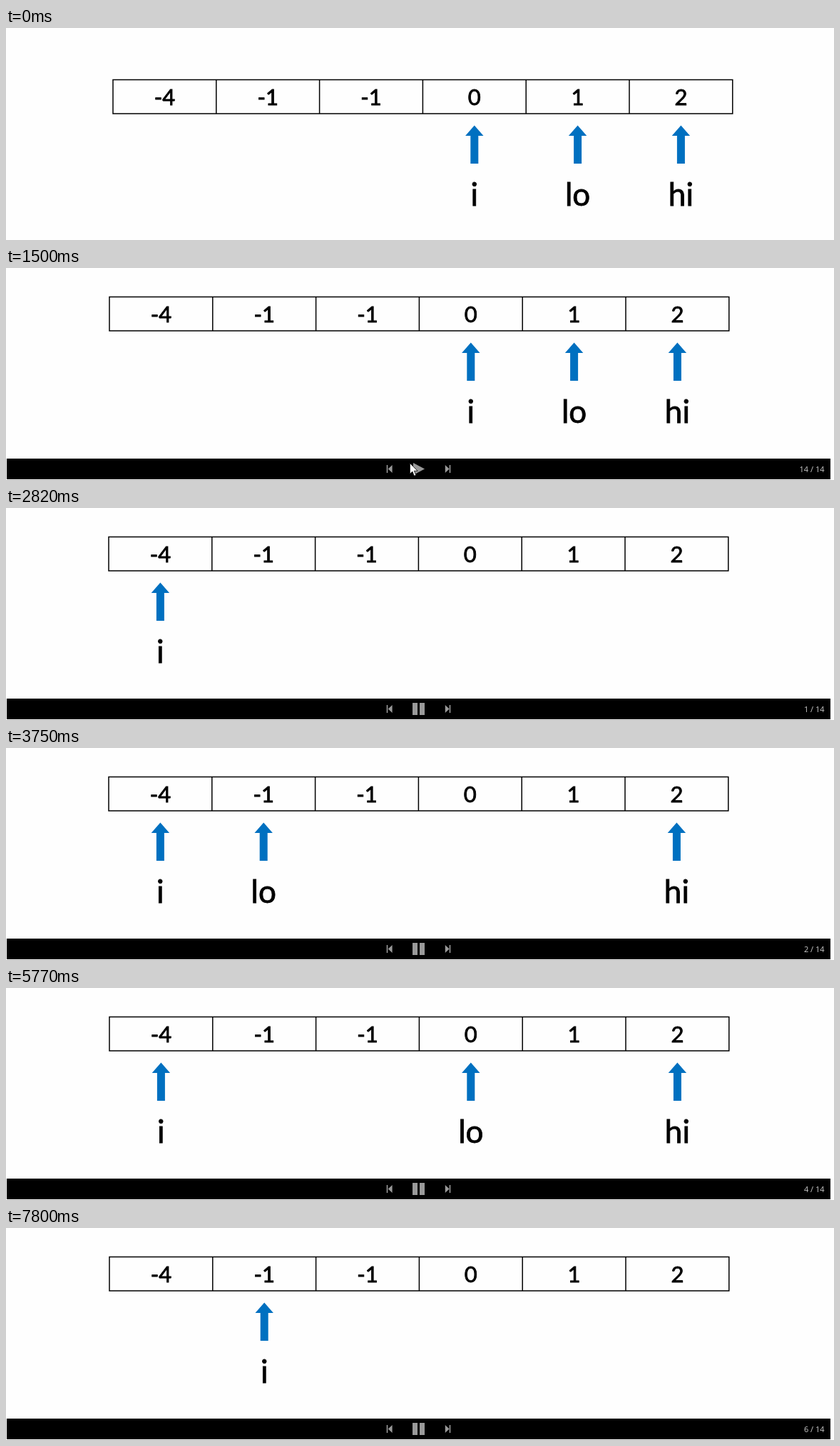
Recreate the animation shown at these times as an HTML page. Size 1161 px wide and 297 px high, loop 8 s.

```html
<!DOCTYPE html>
<html lang="en">
<head>
<meta charset="utf-8">
<title>Three pointers on a sorted array</title>
<style>
  html, body { margin: 0; width: 100%; height: 100%; overflow: hidden; background: #fefefe; }
  svg { display: block; width: 1161px; height: 297px; }
  #slide text { font-family: Lato, Carlito, sans-serif; text-anchor: middle; stroke: #000; stroke-width: .8; }
  .value { font-size: 31px; }
  .label { font-size: 44px; }
  #grid { fill: none; stroke: #000; stroke-width: 1.5; }
  .arrow { fill: #0070c0; }
  #bar { fill: #999; }
  #count { font: 11px "Open Sans", "Noto Sans", sans-serif; text-anchor: end; fill: #ccc; }
</style>
</head>
<body>
<svg viewBox="0 0 1161 297">
  <g id="slide">
    <path id="grid"/>
    <g id="values"></g>
    <g id="marks"></g>
  </g>
  <g id="bar">
    <rect x="1" y="267" width="1155" height="29" fill="#000"/>
    <path d="M533.7 276h1.6v11h-1.6zM541.6 276v11l-5.8-5.5z"/>
    <path d="M623.3 276h-1.6v11h1.6zM615.8 276v11l5.8-5.5z"/>
    <path id="toggle"/>
    <text id="count" x="1147.5" y="286"></text>
  </g>
  <path id="pointer" d="M0 0v15l3.5-3.3 2.6 6.1 2.5-1-2.6-6h4.8z" fill="#fff" stroke="#000" stroke-width=".8"/>
</svg>
<script>
const LOOP = 8000;
const CELL = 144.8, LEFT = 145, TOP = 40.5, ROW = 47.4;
const BAR_IN = 500, ENTER = 1030, HOVER = 1580, CLICK = 1730, LEAVE = 1980, PLAY = 2740;
const SLIDE_MS = 1010, COUNT_MS = 990;
const PLAY_ICON = "M571 273l16 8.5-16 8.5z";
const PAUSE_ICON = "M570 273h7v17h-7zM580 273h7v17h-7z";

const values = [-4, -1, -1, 0, 1, 2];
const names = ["i", "lo", "hi"];
const last = values.length - 1;

// Every i is shown alone, then with each lo between it and hi
const slides = [];
for (let i = 0; i < last - 1; i++) {
  slides.push([i]);
  for (let lo = i + 1; lo < last; lo++) slides.push([i, lo, last]);
}

const $ = id => document.getElementById(id);
const centre = i => LEFT + CELL * (i + 0.5);
const show = (el, on) => el.setAttribute("visibility", on ? "visible" : "hidden");
const move = (el, x, y) => el.setAttribute("transform", `translate(${x} ${y})`);
const clamp = (v, lo, hi) => Math.min(hi, Math.max(lo, v));
const mix = (a, b, p) => a + (b - a) * p;

// Slide number at a time; the last slide stays until playback begins
const page = (t, step) => t < PLAY ? slides.length : 1 + Math.floor((t - PLAY) / step);

function build() {
  let d = `M${LEFT} ${TOP}h${CELL * values.length}v${ROW}H${LEFT}z`;
  for (let i = 1; i <= last; i++) d += `M${LEFT + CELL * i} ${TOP}v${ROW}`;
  $("grid").setAttribute("d", d);
  $("values").innerHTML = values.map((v, i) =>
    `<text class="value" x="${centre(i)}" y="76.3">${v}</text>`).join("");
  $("marks").innerHTML = names.map(n =>
    `<g><path class="arrow" d="M0 104.5l12.7 14.5h-7.2v39h-11v-39h-7.2z"/>
     <text class="label" y="217">${n}</text></g>`).join("");
}

function drawSlide(t) {
  const n = page(t, SLIDE_MS), cells = slides[n - 1];
  const drift = clamp((n - 4) / 2, -1, 0);
  const barOn = t >= BAR_IN;
  move($("slide"), drift + (barOn ? 0 : 5), barOn ? 0 : 32);
  [...$("marks").children].forEach((mark, k) => {
    const on = k < cells.length;
    show(mark, on);
    if (on) move(mark, centre(cells[k]), 0);
  });
}

function drawBar(t) {
  $("bar").style.display = t >= BAR_IN ? "" : "none";
  $("toggle").setAttribute("d", t < CLICK ? PLAY_ICON : PAUSE_ICON);
  $("toggle").setAttribute("fill", t >= HOVER && t < LEAVE ? "#fff" : "#999");
  $("count").textContent = `${page(t, COUNT_MS)} / ${slides.length}`;
}

function drawPointer(t) {
  show($("pointer"), t >= ENTER && t < LEAVE);
  const go = clamp((t - ENTER) / (HOVER - ENTER), 0, 1) ** 2;
  const back = clamp((t - CLICK) / (LEAVE - CLICK), 0, 1);
  move($("pointer"), mix(581, 561, go) + 9 * back, mix(294, 266, go) + 10 * back);
}

function draw(t) {
  drawSlide(t);
  drawBar(t);
  drawPointer(t);
}

build();
draw(0);
const start = performance.now();
function tick() {
  draw((performance.now() - start) % LOOP);
  requestAnimationFrame(tick);
}
requestAnimationFrame(tick);
</script>
</body>
</html>
```
